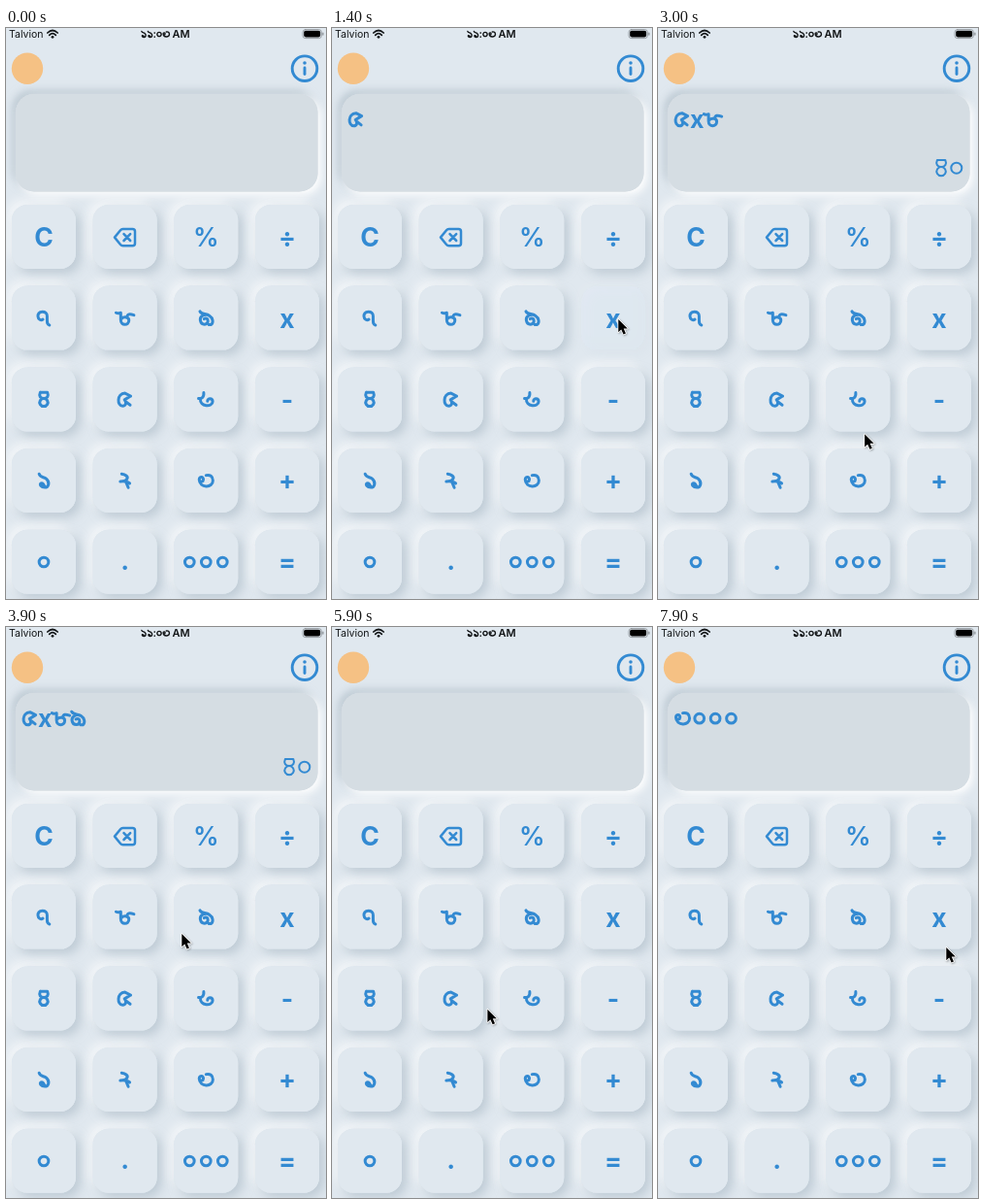
An HTML page with a canvas that plays this animation: 330 px wide and 588 px high, repeating every 8000 ms.

```html
<!DOCTYPE html>
<html lang="as">
<head>
<meta charset="utf-8">
<title>Calculator</title>
<style>
html, body { margin: 0; width: 330px; height: 588px; overflow: hidden; background: #e0e8ef; }
canvas { display: block; width: 330px; height: 588px; }
</style>
</head>
<body>
<canvas id="stage"></canvas>
<script>
const W = 330, H = 588, LOOP = 8000, STEP = 100;
const BLUE = '#338ad2', BASE = '#e0e8ef', INK = '#111416';
const canvas = document.getElementById('stage');
const ctx = canvas.getContext('2d');
const dpr = window.devicePixelRatio || 1;
canvas.width = W * dpr;
canvas.height = H * dpr;

// Bengali digits as pen strokes around their centre: [advance, path]
const DIGITS = {
  '০': [16.4, 'M-5,0.2 a5,5 0 1 0 10,0 a5,5 0 1 0 -10,0'],
  '১': [15, 'M-5,-7 C-4,-3 0,-4 2.5,-2 C7,2 5,7.3 1,7.3 C-3,7.3 -5,4 -3,3 C-1,2.5 0,4 1,7'],
  '২': [15, 'M-3.5,-7 C0,-6.5 4,-4.5 2,-1.5 C1,0.5 -2,1 -5,1 C-1,0.5 3,1 5,3 M1,1.5 L3.5,7.5'],
  '৩': [18, 'M-3,-0.5 C-2,-4 -7,-5 -7.3,-1 C-7,8 7.3,8.5 7.3,0 C7.3,-4.5 4,-6.5 0,-5.5 M-7,0 C-5,2 -3,1 -3,-0.5'],
  '৪': [15, 'M-3.8,-7.3 H3.8 C5.5,-3.5 3.5,-0.8 0,-0.8 C-3.5,-0.8 -5.5,-3.5 -3.8,-7.3 M0,-0.8 a4.3,4.1 0 1 1 -0.1,0'],
  '৫': [16.5, 'M6,-3.5 L0,-6.5 C-9,-6 -8.5,7 -2.5,7 C1,7 2,3.5 -0.5,0.5 L6,-3.5 M1,2.5 L5.5,6'],
  '৬': [18, 'M-8,-1 C-5,-0.5 -2,-2 -2.5,-7 M-6,-1 C-7,8.5 7,8.5 7,2.5 C7,-1.5 1.5,-1.5 1.5,2'],
  '৭': [15, 'M6,7.7 C3.5,7 3.5,5 3.5,2 V-2 C3.5,-5 1.5,-6.5 -1.5,-6.5 C-5,-6.5 -6.5,-4 -6.2,-1.5 C-6,1.5 -3,3 -1,1.5'],
  '৮': [18, 'M-9.5,-5.5 C-7.5,-4.5 -6.5,-5 -4.5,-5.5 V2 C-4.5,8.5 4.2,8.5 4.2,2.5 C4.2,-1 -1,-2 -4,1 M2,-0.5 C2.5,-4.5 5,-4.5 9.5,-3'],
  '৯': [17, 'M-6.5,-7 C-5,-3.5 0,-5 3.5,-2.5 C7.5,0 8,5 5.5,7 H3 M1,-3.5 C-3,-4 -7,-1 -6,3 C-5,8 2,8 2,3 C2,0.5 -0.5,0 -2,1']
};
for (const d in DIGITS) DIGITS[d][1] = new Path2D(DIGITS[d][1]);

const COLS = [39, 122.7, 206.3, 290];
const ROWS = [215, 298.6, 382.4, 466, 549.8];
const LABELS = ['C', '⌫', '%', '÷', '৭', '৮', '৯', 'x', '৪', '৫', '৬', '-', '১', '২', '৩', '+', '০', '.', '০০০', '='];
const KEYS = LABELS.map((label, i) => ({ label, x: COLS[i % 4], y: ROWS[i >> 2] }));
const BASELINES = { 'C': 225, '%': 225, '÷': 224.5, 'x': 308.5, '-': 392, '+': 474.8, '.': 558.3, '=': 558.6 };

// [press time, key, expression afterwards, result afterwards]
const TAPS = [
  [750, '৫', '৫', ''], [1350, 'x', '৫x', ''], [1820, '৮', '৫x৮', ''],
  [2450, '=', '৫x৮', '৪০'], [3650, '৯', '৫x৮৯', '৪০'], [4250, '৮', '৫x৮৯৮', '৪০'],
  [5250, 'C', '', ''], [6400, '৩', '৩', ''], [6900, '০০০', '৩০০০', '']
];

// Pointer stops: [time, x, y]
const STOPS = [
  [200, 342, 545], [700, 124, 382], [1000, 124, 376], [1300, 295, 300], [1550, 295, 300],
  [1800, 128, 298], [2000, 128, 298], [2300, 282, 483], [2450, 286, 546], [2750, 286, 548],
  [3050, 207, 408], [3200, 207, 408], [3500, 199, 314], [3750, 199, 314], [3900, 181, 316],
  [4200, 124, 306], [4500, 124, 306], [5000, 91, 248], [5200, 46, 216], [5500, 46, 216],
  [6100, 200, 456], [6400, 206, 466], [6550, 206, 466], [6800, 198, 543], [7350, 198, 540],
  [7900, 297, 330]
];

function pointerAt(t) {
  const i = STOPS.findIndex(s => s[0] >= t);
  if (i === 0) return STOPS[0].slice(1);
  if (i < 0) return STOPS[STOPS.length - 1].slice(1);
  const [t0, x0, y0] = STOPS[i - 1], [t1, x1, y1] = STOPS[i];
  const u = (t - t0) / (t1 - t0), e = u * u * (3 - 2 * u);
  return [x0 + (x1 - x0) * e, y0 + (y1 - y0) * e];
}

function pressAmount(label, t) {
  const tap = TAPS.find(([at, key]) => key === label && t >= at && t < at + 250);
  if (!tap) return 0;
  const age = t - tap[0];
  return Math.min(1, age / 50, (250 - age) / 100);
}

function write(text, x, y, font, color, align = 'center') {
  ctx.font = font + ' Inter, sans-serif';
  ctx.fillStyle = color;
  ctx.textAlign = align;
  ctx.fillText(text, x, y);
}

function strokeDigit(d, x, y, scale, weight, color) {
  ctx.save();
  ctx.translate(x, y);
  ctx.scale(scale, scale);
  ctx.lineWidth = weight / scale;
  ctx.strokeStyle = color;
  ctx.stroke(DIGITS[d][1]);
  ctx.restore();
}

function strokePath(d, width, color) {
  ctx.lineWidth = width;
  ctx.strokeStyle = color;
  ctx.stroke(new Path2D(d));
}

function box(x, y, w, h, r, color) {
  ctx.fillStyle = color;
  ctx.beginPath();
  ctx.roundRect(x, y, w, h, r);
  ctx.fill();
}

function shade(color, offset, blur) {
  ctx.shadowColor = color;
  ctx.shadowOffsetX = ctx.shadowOffsetY = offset * dpr;
  ctx.shadowBlur = blur * dpr;
}

function disc(x, y, r, color) {
  ctx.fillStyle = color;
  ctx.beginPath();
  ctx.arc(x, y, r, 0, 7);
  ctx.fill();
}

// A rounded box with one shadow to the upper left and one to the lower right
function relief(x, y, w, h, r, color, upper, lower, offset, blur) {
  ctx.save();
  shade(upper, -offset, blur);
  box(x, y, w, h, r, color);
  shade(lower, offset, blur);
  box(x, y, w, h, r, color);
  ctx.restore();
  box(x, y, w, h, r, color);
}

function drawStatus() {
  write('Talvion', 3, 10, '400 10.5px', INK, 'left');
  strokePath('M42.8,5 Q48,0 53.2,5 M44.7,7.3 Q48,4 51.3,7.3', 1.7, INK);
  disc(48, 9.3, 1.4, INK);
  [['১', 142], ['১', 148.5], ['০', 158], ['৩', 165.3]].forEach(([d, x]) => strokeDigit(d, x, 6.4, 0.43, 1.4, INK));
  write(':', 153.3, 10, '600 11px', INK);
  write('AM', 171.5, 10, '600 11px', INK, 'left');
  ctx.lineWidth = 0.8;
  ctx.strokeStyle = '#858b90';
  ctx.beginPath();
  ctx.roundRect(306, 1.6, 19.4, 9, 2.8);
  ctx.stroke();
  box(307.2, 2.8, 17, 6.6, 1.8, '#000');
  box(326.3, 4.5, 1.2, 3.2, 0.6, '#858b90');

  disc(22, 41.8, 16.2, '#f5c184');
  strokePath('M295.2,41.7 a12.8,12.8 0 1 0 25.6,0 a12.8,12.8 0 1 0 -25.6,0', 2.9, BLUE);
  strokePath('M308,41 V47.5', 2.9, BLUE);
  disc(308, 36, 1.8, BLUE);
}

function drawDisplay(expression, result) {
  relief(10, 68, 311.5, 100.5, 19, '#d5dde3', 'rgba(160,176,188,.6)', '#fff', 3.5, 8);
  let x = 16.5;
  for (const c of expression) {
    const advance = c === 'x' ? 14.5 : DIGITS[c][0];
    if (c === 'x') write(c, x + 7.2, 103, '700 25px', BLUE);
    else strokeDigit(c, x + advance / 2, 94, 0.97, 3, BLUE);
    x += advance;
  }
  x = 316;
  for (const c of [...result].reverse()) {
    const advance = DIGITS[c][0];
    strokeDigit(c, x - advance / 2, 144, 1.1, 2, BLUE);
    x -= advance;
  }
}

function drawLabel({ label, x, y }) {
  if (label === '⌫') {
    strokePath('M112,215.6 L118,208.2 Q119,207 120.5,207 H130.5 Q133,207 133,209.5 V221.7 Q133,224.2 130.5,224.2 H120.5 Q119,224.2 118,223 Z M121.5,212.2 L128.2,219 M128.2,212.2 L121.5,219', 2.5, BLUE);
  } else if (label in BASELINES) {
    write(label, x, BASELINES[label], (label === '%' ? 600 : 700) + ' 26.5px', BLUE);
  } else {
    [...label].forEach((d, i) => strokeDigit(d, x + (i - (label.length - 1) / 2) * 17, y, 0.97, 3, BLUE));
  }
}

function drawPointer([x, y]) {
  const arrow = new Path2D('M0,0 V15 L3.4,11.9 L6,17.6 L8.7,16.4 L6.2,10.8 H10.8 Z');
  ctx.save();
  ctx.translate(x + 0.3, y);
  ctx.scale(0.88, 0.88);
  ctx.lineWidth = 2;
  ctx.strokeStyle = '#fff';
  shade('rgba(0,0,0,.3)', 0.8, 2);
  ctx.stroke(arrow);
  ctx.shadowColor = 'transparent';
  ctx.fillStyle = '#000';
  ctx.fill(arrow);
  ctx.restore();
}

function draw(t) {
  ctx.setTransform(dpr, 0, 0, dpr, 0, 0);
  ctx.lineCap = ctx.lineJoin = 'round';
  ctx.fillStyle = BASE;
  ctx.fillRect(0, 0, W, H);

  const done = TAPS.filter(tap => t >= tap[0] + 120).pop();
  drawDisplay(done ? done[2] : '', done ? done[3] : '');
  for (const { label, x, y } of KEYS) {
    ctx.globalAlpha = 1 - 0.9 * pressAmount(label, t);
    relief(x - 33, y - 33, 66, 66, 16, BASE, 'rgba(255,255,255,.65)', 'rgba(163,179,192,.55)', 5, 11);
  }
  ctx.globalAlpha = 1;
  KEYS.forEach(drawLabel);
  drawStatus();
  drawPointer(pointerAt(t));
}

let shown = -1;
function tick(now) {
  const step = Math.floor((now % LOOP) / STEP);
  if (step !== shown) draw((shown = step) * STEP);
  requestAnimationFrame(tick);
}
draw(0);
requestAnimationFrame(tick);
</script>
</body>
</html>
```
